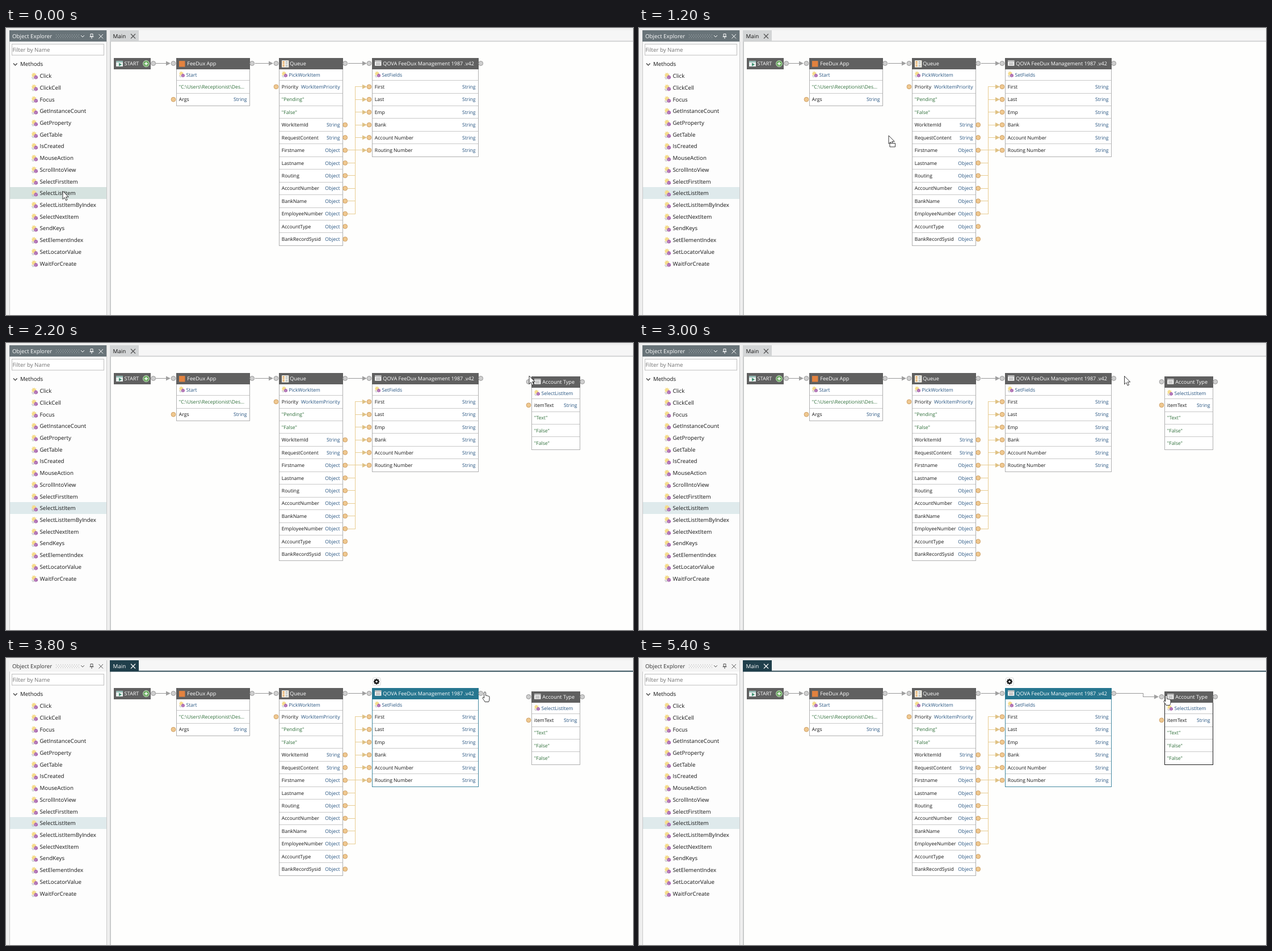
Write an HTML page that moves like this. It is 1105 by 507 pixels and loops after 5600 ms.

```html
<!DOCTYPE html>
<html lang="en">
<head>
<meta charset="utf-8">
<title>Automation designer</title>
<style>
  html, body { margin: 0; width: 100%; height: 100%; overflow: hidden; background: #efefef; }
  svg { display: block; width: 1105px; height: 507px; }
  text { font-family: "Open Sans", "Noto Sans", sans-serif; font-size: 8.65px; fill: #141414; text-rendering: geometricPrecision; }
  .ui { font-size: 9.75px; }
  .title { font-size: 9.1px; fill: #fff; }
  .type { fill: #24527f; }
  .value { fill: #2f6f3a; }
  .end { text-anchor: end; }
  .bar { fill: #606060; }
  .frame { fill: none; stroke: #b0b0b0; }
  .rule { stroke: #c8c8c8; }
  .port { fill: #cfcfcf; stroke: #999; }
  .data { fill: #efc890; stroke: #cfa166; }
  .flow { fill: none; stroke: #979797; }
  .flow-tip { fill: #a0a0a0; }
  .link { fill: none; stroke: #e8cd92; }
  .link-tip { fill: #dfc285; }
  .rule, .frame, .flow, .link { shape-rendering: crispEdges; }
  #row { fill: #d6e3e0; }
  #panelBar { fill: #687378; }
  #panelBarText { fill: #fff; }
  #panelMarks { stroke: #fff; fill: none; }
  #tab { fill: #d3d5d6; }
  #tabLine { fill: #cfd1d2; }
  #tabMark { stroke: #555; }
  .dragged #row, .selected #row { fill: #dfeaec; }
  .selected #panelBar { fill: #f4f4f4; }
  .selected #panelBarText { fill: #303030; }
  .selected #panelMarks { stroke: #555; }
  .selected #tab, .selected #tabLine { fill: #203f4b; }
  .selected #tabText { fill: #fff; }
  .selected #tabMark { stroke: #fff; }
  .selected #target .bar { fill: #27768f; }
  .selected #target .frame { stroke: #4389a0; }
  .hovered #added .frame { stroke: #1a1a1a; }
  #gear, #added, #wire, #joined, #cursor > * { display: none; }
  .selected #gear, .dropped #added, .wiring #wire, .connected #joined { display: inline; }
  .arrow .c-arrow, .drag .c-arrow, .drag .c-box, .hand .c-hand, .cross .c-cross { display: inline !important; }
  .c-arrow, .c-box, .c-hand { fill: #fff; stroke: #222; stroke-width: .9; stroke-linejoin: round; }
  .c-cross { stroke: #111; stroke-width: 1.7; }
</style>
</head>
<body>
<svg id="stage" viewBox="0 0 1105 507" xmlns="http://www.w3.org/2000/svg">
  <defs>
    <g id="method">
      <path d="M1 0L3 1.5 5 0 6 2 8.5 2 7.5 4.5 9 6.5 6.5 7 5 9 3 7.5 0.5 8 1 5.5 0 3.5 2 2.5Z" fill="#f5dc8c"/>
      <path d="M0 9H4M1 11H5" stroke="#b9b9b9"/>
      <path d="M7.5 4.5L11 6.5V10L7.5 12 4.5 10V6.5Z" fill="#a765ad"/>
      <path d="M4.5 6.5L7.5 8.2 11 6.5M7.5 8.2V12" fill="none" stroke="#d7aeda" stroke-width=".7"/>
    </g>
    <g id="form">
      <path d="M0 0H12V10H0Z" fill="#f4f4f4"/>
      <path d="M0 1.5H12" stroke="#a8a8a8" stroke-width="2"/>
      <path d="M2 5H10M2 7.5H10" stroke="#888"/>
    </g>
    <g id="list">
      <path d="M0 0H13V13H0Z" fill="#f8f4ea"/>
      <path d="M1.5 3H5M1.5 6.5H5M1.5 10H5" stroke="#e19b48" stroke-width="2"/>
      <path d="M7 3H11M7 6.5H11M7 10H11" stroke="#8ea4b5" stroke-width="1.5"/>
    </g>
    <g id="square"><path d="M0 1H11V12H0Z" fill="#e2823f"/></g>
  </defs>
  <rect width="1105" height="507" fill="#efefef"/>
  <g id="scene"></g>
  <g id="cursor">
    <path class="c-arrow" d="M0 0V14.5L3.3 11.4 5.6 16.6 8 15.5 5.7 10.4H10.2Z"/>
    <path class="c-box" d="M2 13.5H11.5V20H2Z"/>
    <path class="c-hand" d="M-1.5 10V1.5Q-1.5 0 0 0T1.5 1.5V6.5Q3 5.5 4 7 5.5 6.2 6.3 7.6 8 7 8 9V12Q8 15 6.5 17.5H0Q-1 15-4 11.5-4.8 10-3.5 9.5-2.5 9.3-1.5 11Z"/>
    <path class="c-cross" d="M-10.5 0H10.5M0-10.5V10.5"/>
  </g>
</svg>
<script>
const stage = document.getElementById('stage');
const cursor = document.getElementById('cursor');
const STEP = 22.43;

const text = (x, y, value, cls = '', id = '') =>
  `<text x="${x}" y="${y}" class="${cls}"${id && ` id="${id}"`}>${value}</text>`;
const rect = (x, y, w, h, attrs) => `<rect x="${x}" y="${y}" width="${w}" height="${h}" ${attrs}/>`;
const path = (d, attrs) => `<path d="${d}" ${attrs}/>`;
const icon = (id, x, y, scale = 1) => `<use href="#${id}" transform="translate(${x} ${y}) scale(${scale})"/>`;
const port = (x, y, cls = 'port') => `<circle cx="${x}" cy="${y}" r="3.9" class="${cls}"/>`;
const tip = (x, y, cls) => path(`M${x - 8} ${y - 4}L${x} ${y}L${x - 8} ${y + 4}Z`, `class="${cls}"`);
const flow = (x1, x2) => path(`M${x1} 62.5H${x2 - 7}`, 'class="flow"') + tip(x2, 62.5, 'flow-tip');
const crisp = v => Math.floor(v) + .5;
const rowY = i => 103.8 + i * STEP;

// A row is [label, type]; a label on its own is a literal value.
function node({ id, x, y = 53, w, title, image, method, rows, outputs = [], inputs = [] }) {
  const right = x + w, first = y + 39.7, bottom = crisp(first + rows.length * STEP);
  let out = `<g id="${id}">` + rect(x, y, w, bottom - y, 'fill="#fff"');
  out += rect(x + .5, y + .5, w, bottom - y - .5, 'class="frame"');
  out += rect(x, y, w + 1, 20, 'class="bar"') + icon(image, x + 5, y + 4.2, .95);
  out += text(x + 19.3, y + 13.3, title, 'title');
  out += icon('method', x + 5, y + 23.5, .9) + text(x + 17.5, y + 32.6, method, 'type');
  rows.forEach(([label, type], i) => {
    const top = first + i * STEP, base = top + 14.3;
    out += path(`M${x + 1} ${crisp(top)}H${right}`, 'class="rule"');
    out += text(x + 4.8, base, label, type ? '' : 'value');
    if (type) out += text(right - 4.5, base, type, 'type end');
  });
  out += port(x - 5, y + 9.5) + port(right + 4.7, y + 9.5);
  inputs.forEach(i => out += port(x - 5, y + 50.8 + i * STEP, 'data'));
  outputs.forEach(i => out += port(right + 4.7, y + 50.8 + i * STEP, 'data'));
  return out + '</g>';
}

function explorer() {
  const methods = ['Click', 'ClickCell', 'Focus', 'GetInstanceCount', 'GetProperty', 'GetTable',
    'IsCreated', 'MouseAction', 'ScrollIntoView', 'SelectFirstItem', 'SelectListItem',
    'SelectListItemByIndex', 'SelectNextItem', 'SendKeys', 'SetElementIndex', 'SetLocatorValue',
    'WaitForCreate'];
  let out = rect(6.5, 4.5, 171, 510, 'fill="#fdfdfd" stroke="#c9c9c9"');
  out += rect(6, 4, 171, 20, 'id="panelBar"') + text(11, 18, 'Object Explorer', 'ui', 'panelBarText');
  out += '<g id="panelMarks">';
  for (const y of [12, 14.5, 17])
    out += path(`M${y === 14.5 ? 90 : 88} ${y}H130`, 'stroke-width=".9" stroke-dasharray="1 3" opacity=".55"');
  out += path('M132 13L135 16L138 13M149 10.5H153V15H149ZM147.5 15.5H154.5M151 15.5V19M163.5 11L171 18.5M171 11L163.5 18.5', '') + '</g>';
  out += rect(10.5, 28.5, 162, 19.5, 'fill="#fff" stroke="#bdbdbd"');
  out += `<g opacity=".6">${text(11.5, 42, 'Filter by Name', 'ui')}</g>`;
  out += path('M13 62.5L16.3 65.8L19.6 62.5', 'fill="none" stroke="#333" stroke-width="1.2"');
  out += text(25, 67.2, 'Methods', 'ui') + rect(7, 281, 170, 21, 'id="row"');
  methods.forEach((name, i) => {
    const y = 84.5 + i * 20.72;
    out += icon('method', 45, y - 5.7) + text(59.5, y + 3.6, name, 'ui');
  });
  return out;
}

function canvasArea() {
  return rect(183, 4, 922, 20, 'fill="#f6f6f6"') +
    rect(184, 24, 921, 483, 'fill="#fefefd"') + path('M184 24V507', 'stroke="#b9bcbd" stroke-width="1.5"') +
    rect(183, 4, 51, 20, 'id="tab"') + rect(183, 22.5, 922, 1.8, 'id="tabLine"') +
    text(188.5, 18, 'Main', 'ui', 'tabText') +
    path('M220 10.5L228 18.5M228 10.5L220 18.5', 'id="tabMark" stroke-width="1.2"');
}

function startNode() {
  return rect(190, 53, 65, 20, 'class="bar"') + rect(194, 58, 12, 10, 'fill="#e9f0ef"') +
    path('M194 59.5H206', 'stroke="#78a8a0" stroke-width="2"') + path('M199 61.5L204 64.5L199 67.5Z', 'fill="#3f9270"') +
    text(208.5, 66.3, 'START', 'title') +
    '<circle cx="247" cy="63" r="5.5" fill="#6cab62" stroke="#dcebd8" stroke-width=".8"/>' +
    path('M244 63H250M247 60V66', 'stroke="#fff" stroke-width="1.4"') + port(259.7, 62.5);
}

function links() {
  let out = path(`M615.5 ${rowY(0)}V${rowY(10)}`, 'class="link"');
  for (let i = 0; i < 6; i++) {
    out += path(`M615 ${crisp(rowY(i))}H629`, 'class="link"') + tip(636, rowY(i), 'link-tip');
    out += path(`M602 ${crisp(rowY(i + 5))}H616`, 'class="link"');
  }
  return out;
}

function gear() {
  let teeth = '';
  for (let a = 0; a < 360; a += 45) teeth += rect(-1.2, -5, 2.4, 3, `transform="rotate(${a})"`);
  return `<g id="gear">${rect(646.5, 35, 13.5, 13.5, 'rx="2" fill="#fff" stroke="#d8d8d8"')}` +
    `<g transform="translate(653 41.7)" fill="#151515">${teeth}<circle r="2.8" fill="none" stroke="#151515" stroke-width="2"/></g></g>`;
}

const str = name => [name, 'String'], obj = name => [name, 'Object'];
document.getElementById('scene').innerHTML = canvasArea() + explorer() + startNode() +
  flow(264, 290) + flow(439, 471) + flow(603, 636) + links() +
  node({ id: 'app', x: 300, w: 129, title: 'FeeDux App', image: 'square', method: 'Start', inputs: [1],
    rows: [['"C:\\Users\\Receptionist\\Des...'], str('Args')] }) +
  node({ id: 'queue', x: 481, w: 112, title: 'Queue', image: 'list', method: 'PickWorkItem', inputs: [0],
    outputs: [3, 4, 5, 6, 7, 8, 9, 10, 11, 12],
    rows: [['Priority', 'WorkItemPriority'], ['"Pending"'], ['"False"'], str('WorkItemId'), str('RequestContent'),
      ...['Firstname', 'Lastname', 'Routing', 'AccountNumber', 'BankName', 'EmployeeNumber', 'AccountType', 'BankRecordSysid'].map(obj)] }) +
  node({ id: 'target', x: 645, w: 187, title: 'QOVA FeeDux Management 1987 .v42', image: 'form', method: 'SetFields',
    inputs: [0, 1, 2, 3, 4, 5], rows: ['First', 'Last', 'Emp', 'Bank', 'Account Number', 'Routing Number'].map(str) }) +
  gear() +
  node({ id: 'added', x: 926, y: 59, w: 85, title: 'Account Type', image: 'form', method: 'SelectListItem', inputs: [0],
    rows: [str('itemText'), ['"Text"'], ['"False"'], ['"False"']] }) +
  path('', 'id="wire" class="flow"') +
  `<g id="joined">${path('M841 62.5H888.5V68.5H909', 'class="flow"')}${tip(916, 68.5, 'flow-tip')}</g>`;

// Cursor waypoints: [ms, x, y, shape]
const track = [
  [0, 100, 288, 'arrow'], [1000, 100, 288, 'drag'], [1200, 440, 190, 'drag'], [1400, 815, 84, 'drag'],
  [1600, 922, 56, 'drag'], [2000, 922, 56, 'drag'], [2200, 922, 58, 'arrow'], [2400, 920, 58, 'arrow'],
  [3000, 855.5, 58.5, 'arrow'], [3400, 852, 58.5, 'arrow'], [3800, 844, 60, 'hand'], [4000, 844, 60, 'hand'],
  [4200, 858, 63, 'cross'], [4600, 919, 67.5, 'cross'], [4800, 919, 67.5, 'cross'], [5000, 929, 66, 'hand'],
  [5600, 929, 66, 'hand']
];
// Scene states: [from ms, to ms]
const states = {
  dragged: [1200, 5600], dropped: [2200, 5600], selected: [3800, 5600],
  wiring: [4200, 5000], connected: [5000, 5600], hovered: [5000, 5600]
};
const wire = document.getElementById('wire');

function render(now) {
  const t = Math.floor(now % 5600 / 200) * 200;
  const i = track.findIndex(p => p[0] > t);
  const [t0, x0, y0, shape] = track[i - 1], [t1, x1, y1] = track[i];
  const k = (t - t0) / (t1 - t0);
  const x = x0 + (x1 - x0) * k, y = y0 + (y1 - y0) * k;
  cursor.setAttribute('transform', `translate(${x} ${y})`);
  wire.setAttribute('d', `M845 62.5H${(841 + x) / 2}V${y}H${x}`);
  const active = Object.keys(states).filter(s => t >= states[s][0] && t < states[s][1]);
  stage.setAttribute('class', [shape, ...active].join(' '));
}

const start = performance.now();
function tick() {
  render(performance.now() - start);
  requestAnimationFrame(tick);
}
tick();
</script>
</body>
</html>
```
